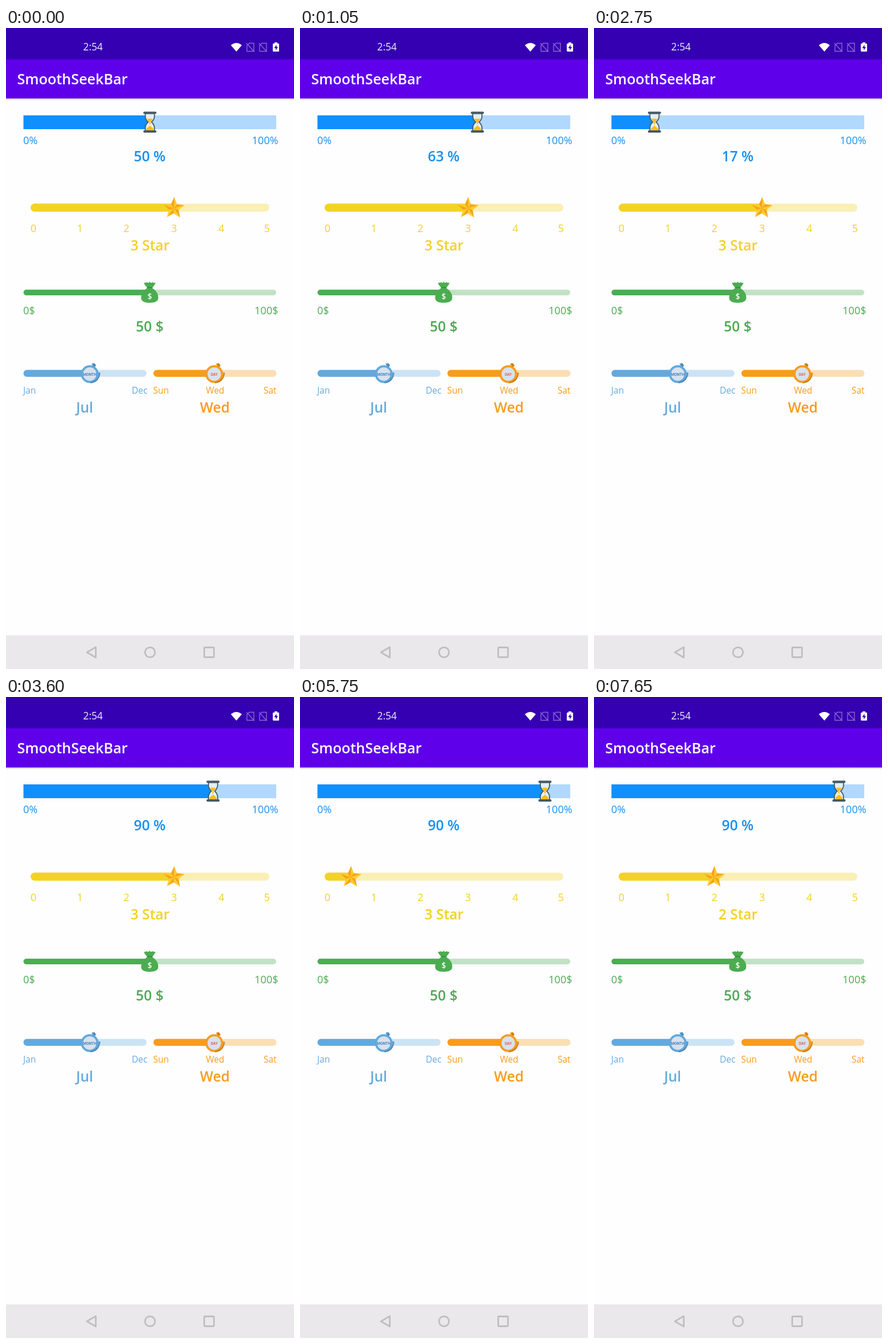
These frames come from a looping animation (502 px wide and 1115 px high, 8 s). An HTML page:

```html
<!DOCTYPE html>
<html lang="en">
<head>
<meta charset="utf-8">
<title>SmoothSeekBar</title>
<style>
  html, body { margin: 0; width: 100%; height: 100%; overflow: hidden; background: #fefdff; }
  svg { display: block; width: 502px; height: 1115px; }
  text { font-family: "Open Sans", "Noto Sans", sans-serif; }
  .value { font-size: 24.5px; font-weight: 600; text-anchor: middle; }
  .label { font-size: 18px; }
  .small { font-size: 15.4px; }
  .mid { text-anchor: middle; }
  .end { text-anchor: end; }
  .tiny { font: 700 6.6px "Roboto", sans-serif; text-anchor: middle; }
</style>
</head>
<body>
<svg viewBox="0 0 502 1115">
  <defs>
    <linearGradient id="shade" x2="0" y2="1">
      <stop stop-color="#000" stop-opacity=".22"/>
      <stop offset="1" stop-color="#000" stop-opacity="0"/>
    </linearGradient>
    <g id="noSim" fill="none" stroke="#8a66d2" stroke-width="1.4">
      <path d="M5 1H13V15H1V5ZM0 1L14 16"/>
    </g>
    <g id="clock">
      <path d="M3-17L8-18L11-14L7-9Z"/>
      <path d="M12-2H18Q17 16 1 17V12Q11 10 12-2Z"/>
      <circle cy="1" r="15.5"/>
      <path d="M18-1Q16 14 1 16" fill="none" stroke="#000" stroke-opacity=".2" stroke-width="2"/>
      <path d="M4-17L8-18L11-14L8-11Z" fill="#000" fill-opacity=".17"/>
      <circle cy="1" r="11.7" fill="#d6e2ef"/>
    </g>
  </defs>

  <rect width="502" height="1115" fill="#fefdff"/>
  <rect y="122" width="502" height="4" fill="url(#shade)"/>
  <rect width="502" height="122.5" fill="#5f00eb"/>
  <rect width="502" height="54.5" fill="#3500b2"/>
  <text x="134.5" y="39" font-size="17.3" fill="#f2edfa">2:54</text>
  <text x="19.5" y="98" font-size="25" font-weight="600" fill="#fff">SmoothSeekBar</text>

  <path d="M392 30Q401.5 22 411 30L401.5 41Z" fill="#fff"/>
  <use href="#noSim" x="419" y="25.5"/>
  <use href="#noSim" x="441" y="25.5"/>
  <path d="M468 27V25H473V27H475Q476 27 476 28V40Q476 41 475 41H467Q465 41 465 40V28Q465 27 467 27Z" fill="#fff"/>
  <path d="M471.5 29L467.5 35H470.2V39L474 33H471.5Z" fill="#3500b2"/>

  <g id="bars"></g>

  <g fill="#1690f2">
    <text class="label" x="30" y="202">0%</text>
    <text class="label end" x="474.5" y="202">100%</text>
    <text class="value" id="percentText" x="250.5" y="232"></text>
  </g>
  <g fill="#f3d222">
    <g id="starLabels"></g>
    <text class="value" id="starText" x="251" y="387"></text>
  </g>
  <g fill="#4bab50">
    <text class="label" x="30" y="498">0$</text>
    <text class="label end" x="474.5" y="498">100$</text>
    <text class="value" x="250.5" y="528">50 $</text>
  </g>
  <g fill="#65aadd">
    <text class="small" x="30" y="636">Jan</text>
    <text class="small end" x="246.5" y="636">Dec</text>
    <text class="value" x="137" y="669">Jul</text>
  </g>
  <g fill="#f89c1c">
    <text class="small" x="256.5" y="636">Sun</text>
    <text class="small mid" x="364.5" y="636">Wed</text>
    <text class="small end" x="471.5" y="636">Sat</text>
    <text class="value" x="364" y="669">Wed</text>
  </g>

  <g id="hourglass">
    <path d="M-8-15H8V-10Q8-5 3 0Q8 5 8 10V15H-8V10Q-8 5-3 0Q-8-5-8-10Z" fill="#e4eef6" stroke="#455a64" stroke-width="1.8"/>
    <path d="M-5-6H5Q4-3 1 0V4H-1V0Q-4-3-5-6ZM0 6L6 11V14H-6V11Z" fill="#fdbd16"/>
    <path d="M-9.5-16.3H9.5M-9.5 16.3H9.5" stroke="#455a64" stroke-width="4" stroke-linecap="round"/>
  </g>
  <g id="star"></g>
  <g transform="translate(250.5 460)">
    <path d="M-4-8Q-10-14-10-17Q-7-16-5-18Q-2-15 0-19Q2-15 5-18Q7-16 10-17Q10-14 4-8Q15-1 15 9Q15 18 0 18Q-15 18-15 9Q-15-1-4-8Z" fill="#4cac51"/>
    <path d="M-5-8.5H5" stroke="#338a3b" stroke-width="1.5"/>
    <text class="mid" y="11.5" font-size="13.5" font-weight="600" fill="#fff">$</text>
  </g>
  <g transform="translate(146 601)">
    <use href="#clock" fill="#61a8dd"/>
    <text class="tiny" y="3.5" fill="#477fbd">MONTH</text>
  </g>
  <g transform="translate(363 601)">
    <use href="#clock" fill="#f79b20"/>
    <text class="tiny" y="3.5" fill="#e5634d">DAY</text>
  </g>

  <rect y="1056.5" width="502" height="58.5" fill="#eae8ea"/>
  <g fill="none" stroke="#bfbec0" stroke-width="2.8" stroke-linejoin="round">
    <path d="M156.5 1077V1095L141 1086Z"/>
    <circle cx="251" cy="1086" r="8.7"/>
    <rect x="345.5" y="1077.5" width="17" height="17" rx="1"/>
  </g>
</svg>
<script>
const LOOP = 8000, STEP = 50;
const get = id => document.getElementById(id);

// Each bar: left, top, width, height, corner radius, colours, filled share
const bars = [
  [30.5, 152, 440.5, 24, 0, '#118fff', '#b1d8ff', .5],
  [43, 305.5, 416, 14, 7, '#f2d324', '#faefb5', .6],
  [30.5, 455.3, 440.5, 9.6, 4.8, '#4cac51', '#c1e2c4', .5],
  [30.5, 594.8, 214.5, 12, 6, '#63a9dd', '#cbe3f4', .545],
  [257, 594.8, 214.5, 12, 6, '#f89c1b', '#fbdfb3', .5]
];
get('bars').innerHTML = bars.map(([x, y, w, h, r, color, track, share], i) => {
  const rect = (width, fill, id = '') =>
    `<rect ${id} x="${x}" y="${y}" width="${width}" height="${h}" rx="${r}" fill="${fill}"/>`;
  return rect(w, track) + rect(w * share, color, `id="fill${i}"`);
}).join('');

get('starLabels').innerHTML = [48, 129, 210, 293, 375.5, 455]
  .map((x, i) => `<text class="label mid" x="${x}" y="355">${i}</text>`).join('');

// Faceted star: light and dark triangles around the centre
const corner = i => {
  const angle = (i / 5 - .5) * Math.PI + .04, radius = i % 2 ? 8.6 : 18.8;
  return `${radius * Math.cos(angle)} ${radius * Math.sin(angle) + .6}`;
};
get('star').innerHTML = Array.from({ length: 10 }, (_, i) => {
  const fill = i % 2 ? '#f7a31c' : '#ffce2b';
  return `<path d="M0 .6L${corner(i)}L${corner(i + 1)}Z" fill="${fill}" stroke="${fill}" stroke-width=".5" stroke-linejoin="round"/>`;
}).join('');

// [time, value] pairs, linear in between
const percentKeys = [[100, 50], [620, 30], [1150, 71], [2165, 71], [2705, 17], [3020, 17], [3750, 90]];
const starKeys = [[3950, 3], [4150, 2], [4600, 2], [4800, 1], [5100, 1], [5300, 0],
  [5650, 0], [6200, 3], [6950, 3], [7350, 1], [7450, 1], [7650, 2]];

const nextKey = (keys, t) => keys.findIndex(key => key[0] > t);
function valueAt(keys, t) {
  const i = nextKey(keys, t);
  if (i < 0) return keys[keys.length - 1][1];
  if (i === 0) return keys[0][1];
  const [t0, a] = keys[i - 1], [t1, b] = keys[i];
  return a + (b - a) * (t - t0) / (t1 - t0);
}
function targetAt(keys, t) {
  const i = nextKey(keys, t);
  return keys[i < 0 ? keys.length - 1 : i][1];
}

function place(bar, thumb, share, y) {
  const [x, , width] = bars[bar];
  get('fill' + bar).setAttribute('width', width * share);
  get(thumb).setAttribute('transform', `translate(${x + width * share} ${y})`);
}

const start = performance.now();
function draw(now) {
  const elapsed = Math.max(0, now - start) % LOOP;
  const t = Math.floor(elapsed / STEP) * STEP;
  const percent = valueAt(percentKeys, t);
  place(0, 'hourglass', percent / 100, 163.7);
  place(1, 'star', valueAt(starKeys, t) / 5, 313);
  // A tap sets the number at once; the thumb follows
  const shown = t < 2150 ? Math.floor(percent) : t < 3000 ? 17 : 90;
  get('percentText').textContent = shown + ' %';
  get('starText').textContent = targetAt(starKeys, t) + ' Star';
  requestAnimationFrame(draw);
}
draw(start);
</script>
</body>
</html>
```
